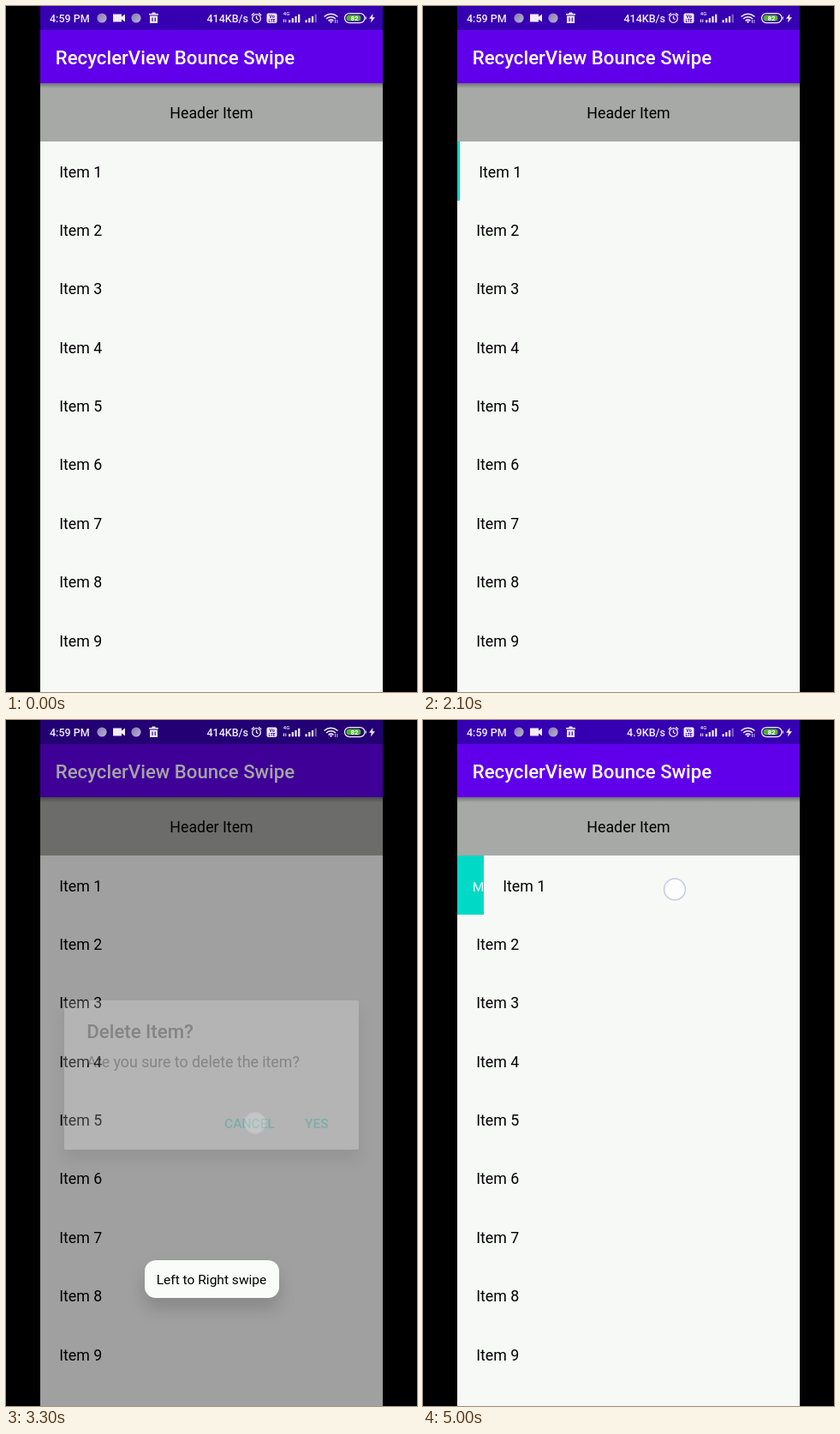
These frames come from a looping animation (480 by 800 pixels, 5.1 s). An HTML page:

```html
<!DOCTYPE html>
<html lang="en">
<head>
<meta charset="utf-8">
<title>RecyclerView Bounce Swipe</title>
<style>
  html, body { margin: 0; width: 100%; height: 100%; overflow: hidden; background: #000; }
  svg { display: block; font-family: Roboto, sans-serif; font-size: 17.78px; }
  .title { font-size: 22.2px; font-weight: 500; }
  .small { font-size: 15.56px; }
  .status { font-size: 12.5px; font-weight: 500; }
  .action { font-size: 15.56px; font-weight: 500; fill: #08d9c6; }
</style>
</head>
<body>
<svg width="480" height="800" viewBox="0 0 480 800">
  <defs>
    <linearGradient id="edge" x2="0" y2="1">
      <stop stop-opacity=".32"/><stop offset="1" stop-opacity="0"/>
    </linearGradient>
    <linearGradient id="ball" x2="1" y2="1">
      <stop stop-color="#8378b0"/><stop offset="1" stop-color="#bdb4d2"/>
    </linearGradient>
    <filter id="high" x="-20%" y="-30%" width="140%" height="170%">
      <feDropShadow dx="0" dy="12" stdDeviation="10" flood-opacity=".36"/>
    </filter>
    <filter id="low" x="-30%" y="-80%" width="160%" height="300%">
      <feDropShadow dx="0" dy="12" stdDeviation="10" flood-opacity=".16"/>
    </filter>
    <clipPath id="screen"><rect x="40" width="400" height="800"/></clipPath>
    <clipPath id="gap"><rect id="gapBox" x="40" y="158" width="0" height="69"/></clipPath>
  </defs>

  <g clip-path="url(#screen)">
    <rect x="40" width="400" height="800" fill="#f7f9f7"/>
    <rect x="40" y="90" width="400" height="68" fill="#a7a9a6"/>
    <rect x="40" y="90" width="400" height="6" fill="url(#edge)"/>
    <text x="240" y="131.2" text-anchor="middle">Header Item</text>

    <g clip-path="url(#gap)">
      <rect x="40" y="158" width="400" height="69" fill="#00d9c6"/>
      <text class="small" x="57.8" y="200.3" fill="#fff" fill-opacity=".9">Message</text>
    </g>
    <g id="rows"></g>

    <rect x="40" y="28" width="400" height="62" fill="#6000ea"/>
    <text class="title" x="57.8" y="68.2" fill="#fff">RecyclerView Bounce Swipe</text>
    <rect x="40" width="400" height="28" fill="#3600b2"/>
    <rect id="dim" x="40" width="400" height="800"/>

    <g id="dialog">
      <rect x="68" y="327" width="344" height="174" rx="2" fill="#fdfefd" filter="url(#high)"/>
      <text class="title" x="94.3" y="371" fill="#1f1f1f">Delete Item?</text>
      <text x="94.3" y="404.6" fill="#212121">Are you sure to delete the item?</text>
      <text class="action" x="255" y="476.2">CANCEL</text>
      <text class="action" x="349" y="476.2">YES</text>
    </g>

    <g id="toast">
      <rect x="162" y="630" width="157" height="44" rx="13" fill="#fafcfa" filter="url(#low)"/>
      <text class="small" x="240" y="658" text-anchor="middle">Left to Right swipe</text>
    </g>

    <circle id="touch" r="12.4" fill="#fff" fill-opacity=".6" stroke="#c9c9e2" stroke-width="1.5"/>

    <g fill="#f2edfb">
      <text class="status" x="51" y="18.7">4:59 PM</text>
      <text class="status" id="speed" x="283" y="18.7" text-anchor="end"></text>
      <circle cx="112" cy="14" r="5.6" fill="url(#ball)"/>
      <circle cx="152" cy="14" r="5.6" fill="url(#ball)"/>
      <path d="M125 9.5h10v3l4-3v9l-4-3v3h-10z"/>
      <path d="M167 9h3l1-1.500h3l1 1.500h3v1.500h-11zM168 11.500h9v8.500h-9z"/>
      <path d="M171 13.500v4.500M174.200 13.500v4.500" stroke="#3600b2" stroke-width="1.200"/>
      <g fill="none" stroke="#f2edfb" stroke-width="1.300">
        <circle cx="292.500" cy="14.500" r="4.800"/>
        <path d="M292.500 11.500v3l2 1.500M286.800 11l3-2.700M298.200 11l-3-2.700"/>
        <path d="M371.500 12.500q8-6.500 16 0M374 15q5.500-4.500 11 0M376.500 17.300q3-2.300 6 0" stroke-width="1.600"/>
        <rect x="395.500" y="8.600" width="23.500" height="11" rx="5.500"/>
      </g>
      <circle cx="379.500" cy="18.600" r="1.200"/>
      <path d="M384.500 16v4M386.800 16v4" stroke="#f2edfb" stroke-width=".8"/>
      <rect x="304.500" y="8.500" width="12" height="11.500" rx="2"/>
      <text x="310.500" y="13.800" text-anchor="middle" font-size="5.500" font-weight="700" fill="#3600b2">Vo</text>
      <text x="310.500" y="19" text-anchor="middle" font-size="5" font-weight="700" fill="#3600b2">LTE</text>
      <text x="323.800" y="11.300" font-size="6" font-weight="500">4G</text>
      <path d="M324.500 15.500v3.500M326.700 15.500v3.500" stroke="#f2edfb" stroke-width="1"/>
      <g id="bars"></g>
      <rect x="397.500" y="10.600" width="17" height="7" rx="3.500" fill="#4fb52c"/>
      <path d="M420.200 12.500v3" stroke="#f2edfb" stroke-width="1.200"/>
      <text x="407" y="17.100" text-anchor="middle" font-size="8" font-weight="700" fill="#fff">82</text>
      <path d="M428.500 9l-4.500 5.800h2.800l-.8 4.700 5-6.300h-3z"/>
    </g>
  </g>
</svg>
<script>
const LOOP = 5100, STEP = 100;
const $ = id => document.getElementById(id);

$('rows').innerHTML = Array.from({ length: 9 }, (_, i) =>
  `<text x="62.2" y="${199.6 + 68.37 * i}">Item ${i + 1}</text>`).join('');

const signal = (x, n) => Array.from({ length: n }, (_, i) => {
  const h = 3 + i * 2.2;
  return `<rect x="${x + i * 3.7}" y="${19.3 - h}" width="2.2" height="${h}"/>`;
}).join('');
$('bars').innerHTML = signal(330, 4) + signal(349.5, 3) +
  '<rect x="360.6" y="9.700" width="2.200" height="9.600" opacity=".4"/>';

// Linear interpolation through [time, value] pairs, held at both ends
function along(keys, t) {
  const n = keys.findIndex(k => k[0] > t);
  if (n < 0) return keys[keys.length - 1][1];
  if (n === 0) return keys[0][1];
  const [t0, a] = keys[n - 1], [t1, b] = keys[n];
  return a + (b - a) * (t - t0) / (t1 - t0);
}

const shift = [[1000, 0], [1100, 14], [1300, 40], [1600, 62], [1900, 67], [2000, 20],
  [2100, 3], [2200, 0], [4500, 0], [4600, 3], [4700, 12], [4800, 20], [4900, 26], [5000, 31]];
const dim = [[2100, 0], [2200, .3], [2300, .6], [3200, .6], [3300, .355], [3400, .1], [3500, 0]];
const dialog = [[2100, 0], [2200, .5], [2300, 1], [3200, 1], [3300, .21], [3400, 0]];
const toast = [[2200, 0], [2300, 1], [4100, 1], [4300, 0]];
const presses = [
  { from: 900, to: 1900, x: [[900, 234], [1000, 239], [1300, 312], [1600, 350], [1900, 360]],
    y: [[1000, 205], [1500, 198]] },
  { from: 3200, to: 3300, x: [[3200, 291]], y: [[3200, 470]], faint: true },
  { from: 4500, to: 5000, x: [[4500, 232], [4600, 246], [4900, 286], [5000, 294]],
    y: [[4500, 201], [5000, 197.500]] }
];

function draw(t) {
  const dx = along(shift, t);
  $('gapBox').setAttribute('width', dx);
  $('rows').firstChild.setAttribute('x', 62.2 + dx);
  $('dim').setAttribute('opacity', along(dim, t));
  $('dialog').setAttribute('opacity', along(dialog, t));
  $('toast').setAttribute('opacity', along(toast, t));
  $('speed').textContent = t < 4000 ? '414KB/s' : '4.9KB/s';

  const press = presses.find(p => t >= p.from && t <= p.to);
  const touch = $('touch');
  touch.setAttribute('opacity', press ? (press.faint ? .4 : 1) : 0);
  if (press) {
    touch.setAttribute('cx', along(press.x, t));
    touch.setAttribute('cy', along(press.y, t));
  }
}

const start = performance.now();
function tick() {
  const t = (performance.now() - start) % LOOP;
  draw(Math.floor(t / STEP) * STEP);
  requestAnimationFrame(tick);
}
tick();
</script>
</body>
</html>
```
